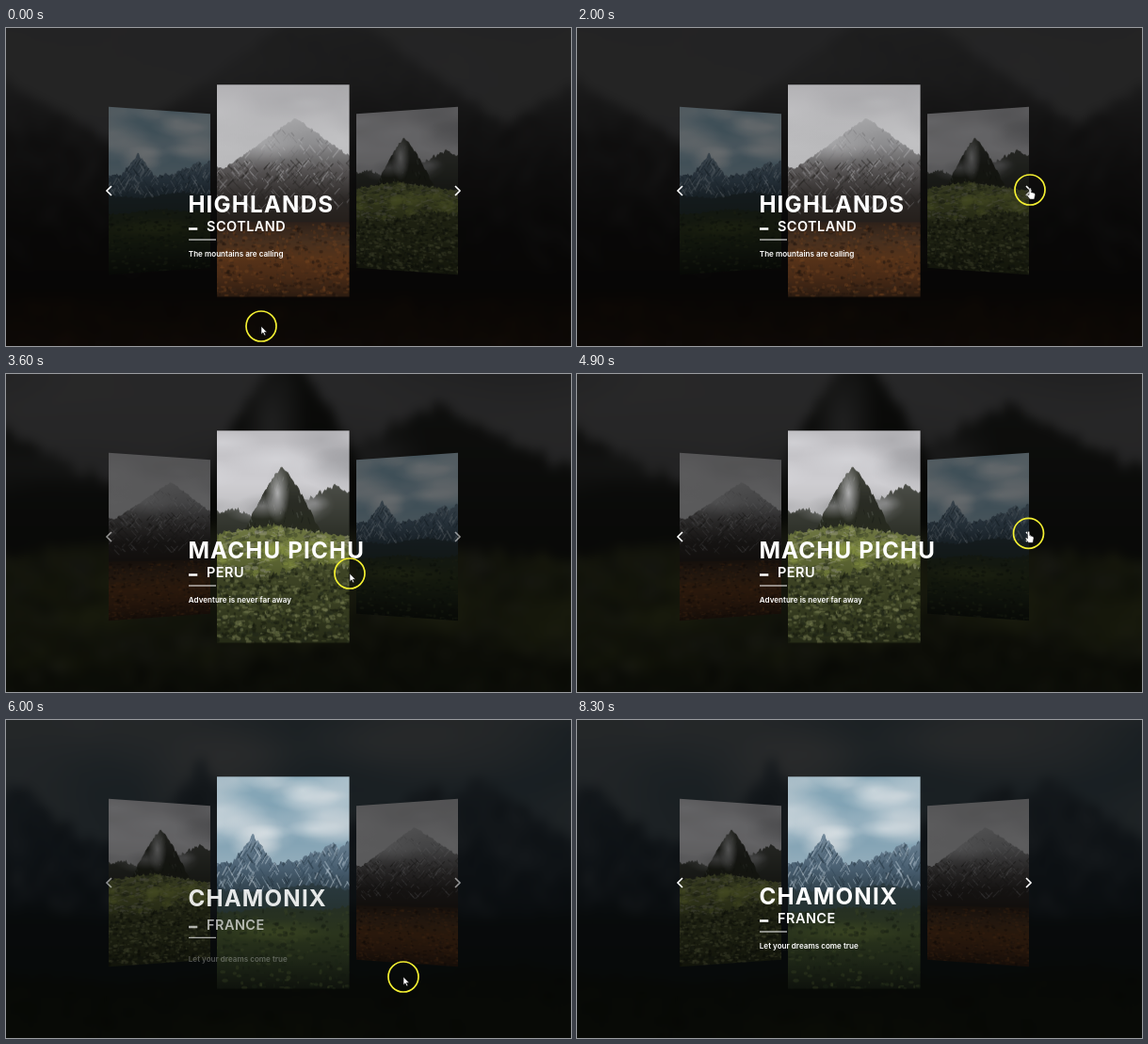
An HTML page with a canvas for the animation above (9 s loop, 600 by 338 pixels).

```html
<!DOCTYPE html>
<html lang="en">
<head>
<meta charset="utf-8">
<title>Travel slider</title>
<style>
  html, body { margin: 0; width: 100%; height: 100%; overflow: hidden; background: #08080a; }
  #stage { position: relative; width: 600px; height: 338px; overflow: hidden; background: #08080a; }
  #stage > * { position: absolute; left: 0; top: 0; }
  #stage > .bg { left: -164px; top: -20px; filter: brightness(.19) blur(6px); }
  .card { width: 140px; height: 225px; transform-origin: 0 0; }
  svg { display: block; overflow: visible; z-index: 10; }
  #info { transform-origin: 294.3px 173px; }
  text { font-family: Inter, "Open Sans", sans-serif; fill: #fff; }
  .name { font-size: 24.2px; font-weight: 700; letter-spacing: 1.15px; }
  .place { font-size: 14.5px; font-weight: 600; letter-spacing: .45px; }
  .desc { font-size: 8.1px; font-weight: 600; }
</style>
</head>
<body>
<div id="stage">
  <svg id="info" width="600" height="338"></svg>
  <svg id="ui" width="600" height="338">
    <path id="arrows" d="M112 168l-5 5 5 5M477 168l5 5-5 5" fill="none" stroke="#fff" stroke-width="1.6"/>
    <g id="cursor">
      <circle id="press" r="7.5" cx="1" cy="1" fill="#0a1222" fill-opacity=".7" stroke="#1c2b4a" stroke-width="1.5"/>
      <circle id="halo" r="16" fill="none" stroke="#f4f032" stroke-width="1.7"/>
      <path id="pointer" d="M0 0v8.6l2-1.8 1.4 3 1.4-.6-1.4-2.9h2.7z" fill="#fff" stroke="#111" stroke-width=".6"/>
      <path id="hand" d="M-1-1.5q1.1-1.2 2.2 0v4l3.4.9q1.1.5.9 2l-.9 4.6h-4.6l-3.3-4.2q0-1.6 1.4-.9l.9.8z" fill="#fff" stroke="#111" stroke-width=".5"/>
    </g>
  </svg>
</div>
<script>
const LOOP = 9000, STEP = 100, SLIDE = 800, TILT = 17.5;
const CX = 294.3, CY = 173, W = 140, H = 225;
const X0 = -90, X1 = 230, ZOOM = 2.9;   // a scene is wider than its card; the backdrop is the same scene, enlarged
const clicks = [2415, 5135];
const $ = id => document.getElementById(id);
const clamp = x => Math.max(0, Math.min(1, x));
const mix = (a, b, k) => a + (b - a) * k;
const smooth = k => k * k * (3 - 2 * k);
const outQuad = x => 1 - (1 - clamp(x)) ** 2;

// cubic-bezier(.25, .1, .25, 1)
function ease(x) {
  if (x <= 0 || x >= 1) return clamp(x);
  const curve = (s, a, b) => 3 * (1 - s) * (1 - s) * s * a + 3 * (1 - s) * s * s * b + s ** 3;
  let lo = 0, hi = 1;
  for (let i = 0; i < 24; i++) {
    const m = (lo + hi) / 2;
    if (curve(m, .25, .25) < x) lo = m; else hi = m;
  }
  return curve(lo, .1, 1);
}

// ---------- painting ----------
let seed = 1, g;
const rnd = (a = 0, b = 1) => {
  seed = (seed * 16807) % 2147483647;
  return a + (b - a) * seed / 2147483647;
};
const pick = list => list[Math.floor(rnd(0, list.length))];

function fade(y0, y1, ...colors) {
  const f = g.createLinearGradient(0, y0, 0, y1);
  colors.forEach((c, i) => f.addColorStop(i / (colors.length - 1), c));
  return f;
}

function band(y0, y1, ...colors) {
  g.fillStyle = fade(y0, y1, ...colors);
  g.fillRect(X0, y0, X1 - X0, y1 - y0 + 1);
}

function blob(x, y, rx, ry, color, alpha) {
  const f = g.createRadialGradient(0, 0, 0, 0, 0, 1);
  f.addColorStop(0, color);
  f.addColorStop(1, color + '00');
  g.save();
  g.globalAlpha = alpha;
  g.translate(x, y);
  g.scale(rx, ry);
  g.fillStyle = f;
  g.fillRect(-1, -1, 2, 2);
  g.restore();
}

function clouds(n, y0, y1, size, colors, alpha) {
  for (let i = 0; i < n; i++) {
    const r = size * rnd(.5, 1.4);
    blob(rnd(X0, X1), rnd(y0, y1), r, r * rnd(.3, .65), pick(colors), alpha);
  }
}

// skyline over peaks [x, y, slope]; detail is painted inside it
function ridge(peaks, rough, fill, detail, bend = 1) {
  g.save();
  g.beginPath();
  g.moveTo(X0, H);
  for (let x = X0; x <= X1; x += 1.5) {
    const y = Math.min(...peaks.map(([px, py, k]) => py + k * Math.abs(x - px) ** bend));
    g.lineTo(x, y + rough * (Math.sin(x * .37 + seed) + Math.sin(x * .8) * .6 + rnd(-.7, .7)));
  }
  g.lineTo(X1, H);
  g.fillStyle = fill;
  g.fill();
  if (detail) { g.clip(); detail(); }
  g.restore();
}

function streaks(n, y0, y1, colors, len, lean, alpha) {
  g.globalAlpha = alpha;
  for (let i = 0; i < n; i++) {
    const x = rnd(X0, X1), y = rnd(y0, y1), l = rnd(.3, 1) * len;
    g.strokeStyle = pick(colors);
    g.lineWidth = rnd(.4, 1.6);
    g.beginPath();
    g.moveTo(x, y);
    g.lineTo(x + pick([-lean, lean]) * l, y + l);
    g.stroke();
  }
  g.globalAlpha = 1;
}

function spots(n, y0, y1, colors, size, alpha) {
  g.globalAlpha = alpha;
  for (let i = 0; i < n; i++) {
    g.fillStyle = pick(colors);
    g.beginPath();
    g.ellipse(rnd(X0, X1), rnd(y0, y1), size * rnd(.4, 1.5), size * rnd(.3, 1), 0, 0, 7);
    g.fill();
  }
  g.globalAlpha = 1;
}

function highlands() {
  band(0, 130, '#b2b1b4', '#bebec0', '#b0b0b2');
  clouds(14, 0, 60, 50, ['#a3a3a6', '#c6c6c8'], .5);
  ridge([[83, 35, .72], [-40, 62, .6], [190, 58, .6]], .8,
    fade(35, 150, '#a6a6a8', '#8c8c8e', '#545151', '#2c2826', '#241e1a'), () => {
      streaks(450, 46, 100, ['#5c5b5c', '#6f6f70', '#bcbcbe'], 9, .8, .4);
      streaks(650, 78, 130, ['#262423', '#353231', '#838283'], 9, .9, .5);
    });
  clouds(6, 40, 70, 40, ['#b8b8ba'], .35);
  band(146, H, '#2f221a', '#47301f', '#573319', '#482a16', '#2c1c11');
  spots(1300, 148, H, ['#70431f', '#20140d', '#5a361b', '#3a291b'], 2, .45);
}

function machu() {
  band(0, 110, '#bdbcc0', '#cfced2', '#b4b4b6');
  clouds(16, 5, 50, 50, ['#909094', '#dcdce0', '#a2a2a6'], .6);
  ridge([[125, 58, .5], [18, 82, .4], [-50, 60, .5], [215, 60, .5]], 1.5, fade(55, 115, '#4c4e48', '#2b2e26'));
  clouds(12, 64, 92, 30, ['#a9a9ac', '#77787a'], .5);
  ridge([[69, 39, .6]], 1, fade(39, 112, '#45473f', '#2a2c25', '#262a1d'),
    () => streaks(260, 42, 110, ['#171a15', '#5a5d55'], 8, .3, .45), 1.28);
  blob(64, 66, 13, 32, '#c4c4c6', .85);
  blob(48, 80, 26, 14, '#a4a4a6', .6);
  ridge([[60, 100, .15], [160, 114, .1], [-50, 112, .1]], 1.2, fade(100, 160, '#6f7744', '#626b36', '#4a5229'), () => {
    spots(520, 100, 160, ['#8a8a78', '#3c4427', '#838f43', '#2e3520'], 3, .5);
    streaks(420, 102, 150, ['#9b9b8a', '#33392a'], 3, 3, .5);
    clouds(14, 118, 155, 18, ['#93a046'], .6);
  });
  ridge([[110, 140, .22], [20, 152, .15], [-70, 148, .2], [200, 146, .2]], 2, fade(140, H, '#3f4526', '#393f22', '#262b17'),
    () => spots(2200, 138, H, ['#161a0e', '#787e52', '#4c5430', '#23291a'], 2.3, .5));
}

function chamonix() {
  band(0, 115, '#8aaaba', '#7c9fb2', '#a3b7c2');
  clouds(40, 0, 84, 40, ['#d9dfe3', '#c6d0d6', '#e6eaec'], .5);
  ridge([[38, 62, 1.3], [-30, 70, .8], [104, 78, .6], [122, 70, .8], [140, 68, .7], [200, 76, .6], [10, 90, .4], [75, 88, .4]], 1.5,
    fade(62, 132, '#71889a', '#4a6072', '#26353d'), () => {
      streaks(620, 64, 112, ['#24343f', '#34495a', '#a9bac6', '#8398a6'], 10, .6, .55);
      streaks(160, 66, 118, ['#1f2d37', '#c0ccd4'], 12, .5, .5);
    });
  ridge([[100, 114, .15], [20, 120, .12], [220, 112, .1], [-60, 112, .12]], 1, fade(112, 160, '#2b3a40', '#232f2a'));
  ridge([[70, 138, .1], [150, 136, .15], [-30, 140, .1]], 1, fade(138, H, '#263024', '#2b351d', '#1e2617', '#0f130d'), () => {
    blob(62, 164, 60, 14, '#434e25', .6);
    spots(700, 142, H, ['#12180f', '#384324', '#1b2316'], 2.3, .4);
  });
}

function makeCanvas(cls, w, h) {
  const c = document.createElement('canvas');
  c.className = cls;
  c.width = w;
  c.height = h;
  return c;
}

function cut(cls, wide, x, y, w, h, scale) {
  const c = makeCanvas(cls, w * scale, h * scale);
  c.getContext('2d').drawImage(wide, (x - X0) * 2, y * 2, w * 2, h * 2, 0, 0, c.width, c.height);
  $('stage').insertBefore(c, $('info'));
  return c;
}

const scenes = [highlands, machu, chamonix].map((paint, i) => {
  const c = makeCanvas('', (X1 - X0) * 2, H * 2);
  g = c.getContext('2d');
  g.scale(2, 2);
  g.translate(-X0, 0);
  seed = 4021 + i * 97;
  paint();
  return c;
});
const bgs = scenes.map(s => cut('bg', s, X0, 40, X1 - X0, 378 / ZOOM, ZOOM));
const cards = scenes.map(s => cut('card', s, 0, 0, W, H, 2));

// ---------- captions ----------
const infos = [
  ['HIGHLANDS', 'SCOTLAND', 'The mountains are calling'],
  ['MACHU PICHU', 'PERU', 'Adventure is never far away'],
  ['CHAMONIX', 'FRANCE', 'Let your dreams come true']
].map(([name, place, desc]) => [
  `<text class="name" x="193.4" y="195.8">${name}</text>`,
  `<text class="place" x="213" y="216.2">${place}</text>
   <path d="M194 212.3h9.3v2.5h-9.3zM194 224.4h29v1.1h-29z" fill="#fff"/>`,
  `<text class="desc" x="193.8" y="243.4">${desc}</text>`
].map(html => {
  const el = document.createElementNS('http://www.w3.org/2000/svg', 'g');
  el.innerHTML = html;
  $('info').appendChild(el);
  return el;
}));

// ---------- motion ----------
// pointer stops: time, x, y
const stops = [[0, 271, 317], [480, 278, 270], [1100, 357, 188], [1800, 481, 172], [3100, 481, 172], [3600, 365, 212],
  [4200, 102, 283], [4600, 375, 290], [4900, 479.5, 169.3], [5500, 480, 170], [6000, 422, 273], [6500, 352, 250], [7400, 222, 215]];

function cursorAt(t) {
  const i = stops.findIndex(p => p[0] > t);
  if (i < 0) return stops[stops.length - 1].slice(1);
  const [t0, x0, y0] = stops[i - 1], [t1, x1, y1] = stops[i];
  const k = smooth((t - t0) / (t1 - t0));
  return [mix(x0, x1, k), mix(y0, y1, k)];
}

// the card leans towards the half the pointer is over
function leanAt(t) {
  const [x, y] = cursorAt(t);
  const over = Math.abs(x - CX) < 70.3 && Math.abs(y - CY) < 112.7;
  return over ? Math.sign(x - CX) * TILT : 0;
}
const leans = [];
for (let t = 0, last = 0; t < LOOP; t += 10) {
  const to = leanAt(t);
  if (to !== last) leans.push({ t, from: tiltAt(t), to });
  last = to;
}
function tiltAt(t) {
  const l = leans.filter(m => m.t <= t).pop();
  return l ? mix(l.from, l.to, ease((t - l.t) / SLIDE)) : 0;
}

// a card is two upright edges: x left, x right, height left, height right, brightness
function slots(deg) {
  const a = deg * Math.PI / 180, half = 70.3;
  const far = 1 + half * Math.sin(a) / 452, near = 2 - far, w = half * Math.cos(a);
  return [
    [CX - w / far, CX + w / near, 225.5 / far, 225.5 / near, 1],
    [372, 480, 163.5, 178.5, .48],
    [109, 217, 178.5, 163.5, .48]
  ];
}

function place(el, [xl, xr, hl, hr, light]) {
  const r = hl / hr;
  const m = [(xr * r - xl) / W, CY * (r - 1) / W, 0, (r - 1) / W, 0, hl / H, 0, 0, 0, 0, 1, 0, xl, CY - hl / 2, 0, 1];
  el.style.transform = `matrix3d(${m.map(v => v.toFixed(7))})`;
  el.style.filter = `brightness(${light})`;
}

function draw(t) {
  const n = t >= clicks[1] ? 1 : 0;
  const since = t - clicks[n];
  const e = ease(since / SLIDE);
  const deg = tiltAt(t), slot = slots(deg);

  cards.forEach((el, s) => {
    const a = (s - n + 3) % 3, b = (a + 2) % 3;
    place(el, slot[a].map((v, i) => mix(v, slot[b][i], e)));
    el.style.zIndex = 3 - (e > 0 ? [1, 0, 2][a] : a);
  });

  bgs.forEach((el, s) => {
    const a = s - n;
    el.style.opacity = a === 0 ? 1 - e : a === 1 ? e : 0;
    el.style.transform = `translateX(${a === 0 ? -150 * e : 150 * (1 - e)}px)`;
  });

  $('info').style.transform = `perspective(900px) rotateY(${-deg}deg)`;
  infos.forEach((parts, s) => parts.forEach((el, k) => {
    const show = s ? outQuad((t - clicks[s - 1] - 600 - 100 * k) / 400) : 1;
    const hide = s < 2 ? outQuad((t - clicks[s] - 100 * k) / 400) : 0;
    el.setAttribute('transform', `translate(0 ${18.7 * (1 - show) - 56 * hide})`);
    el.setAttribute('opacity', show * (1 - hide));
  }));

  const dim = clamp(since / 300) - clamp((since - 1200) / 300);
  $('arrows').setAttribute('opacity', 1 - .45 * dim);

  const [x, y] = cursorAt(t);
  const pressed = since >= 0 && since < 550;
  const onArrow = Math.hypot(x - 480, y - CY) < 9;
  const show = (id, on) => $(id).setAttribute('visibility', on && t < 7500 ? 'visible' : 'hidden');
  $('cursor').setAttribute('transform', `translate(${x} ${y})`);
  show('halo', !pressed);
  show('press', pressed);
  show('hand', onArrow);
  show('pointer', !onArrow);
}

const begin = performance.now();
function tick() {
  const t = (performance.now() - begin) % LOOP;
  draw(Math.floor(t / STEP) * STEP);
  requestAnimationFrame(tick);
}
tick();
</script>
</body>
</html>
```
